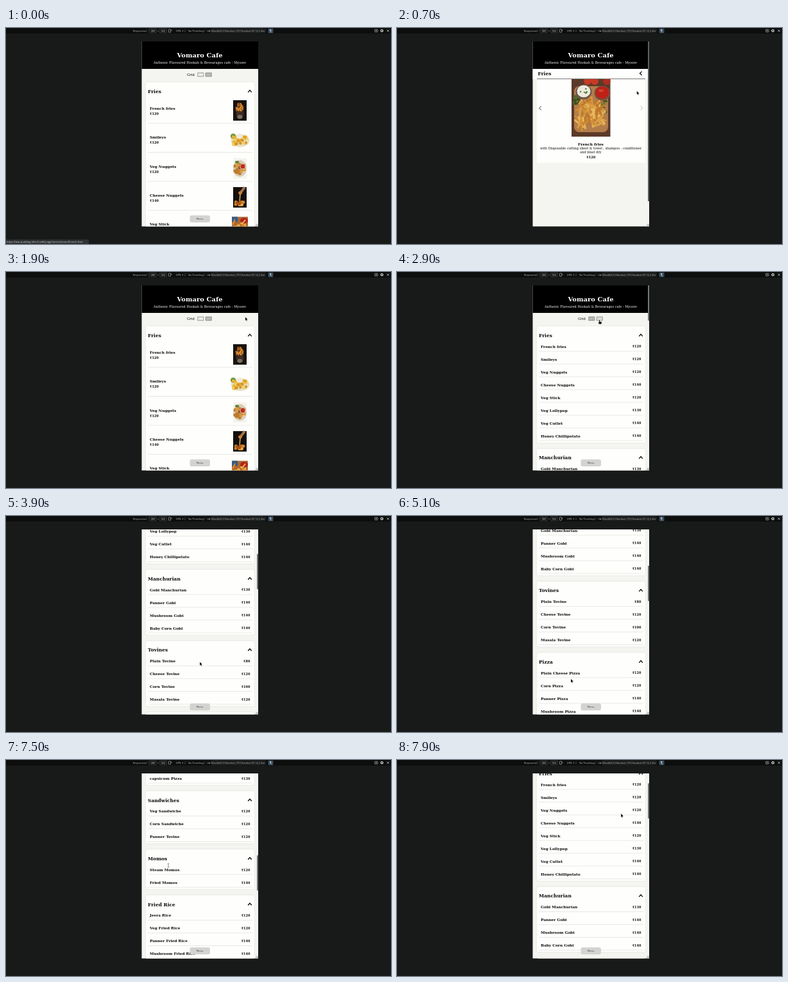
An HTML page with a canvas that plays this animation: 600x338 px, repeating every 8 s.

```html
<!DOCTYPE html>
<html lang="en">
<head>
<meta charset="utf-8">
<title>Cafe menu</title>
<style>
html, body { margin: 0; width: 100%; height: 100%; overflow: hidden; background: #171a19; }
canvas { display: block; width: 600px; height: 338px; }
</style>
</head>
<body>
<canvas id="stage" width="600" height="338"></canvas>
<script>
const c = document.getElementById('stage').getContext('2d');
const LOOP = 8000, STEP = 100;
const SERIF = '"DejaVu Serif", serif', SANS = '"Noto Sans", sans-serif';

const menu = [
  ['Fries', 'French fries 120,Smileys 120,Veg Nuggets 120,Cheese Nuggets 140,Veg Stick 120,Veg Lollypop 130,Veg Cutlet 140,Honey Chillipotato 140'],
  ['Manchurian', 'Gobi Manchurian 130,Panner Gobi 140,Mushroom Gobi 140,Baby Corn Gobi 140'],
  ['Tovines', 'Plain Tovine 80,Cheese Tovine 120,Corn Tovine 100,Masala Tovine 120'],
  ['Pizza', 'Plain Cheese Pizza 120,Corn Pizza 120,Panner Pizza 140,Mushroom Pizza 140,Onion Pizza 130,Tomato Pizza 130,Baby Corn Pizza 140,capsicum Pizza 130'],
  ['Sandwiches', 'Veg Sandwiche 120,Corn Sandwiche 120,Panner Tovine 120'],
  ['Momos', 'Steam Momos 120,Fried Momos 140'],
  ['Fried Rice', 'Jeera Rice 120,Veg Fried Rice 120,Panner Fried Rice 140,Mushroom Fried Rice 140,Corn Fried Rice 140'],
  ['Soft Drinks', 'Blim 50,Glinta 50,Orchard Fog 50,Tanbrok - can 150,Grumbox - Can 150,Vultarix 80,Zolva 50,lime Soda 60,lime Mint Soda 60'],
  ['Milkshakes', 'Dobi Milkshake 130,Chocolate Milkshake 130,Black Current Milkshake 130,Vanilla Milkshake 130']
].map(([title, items]) => [title, items.split(',').map(s => s.match(/(.*) (\d+)/).slice(1))]);

// Drawing helpers
function rect(x, y, w, h, fill, r = 0, stroke) {
  c.beginPath();
  c.roundRect(x, y, w, h, r);
  if (fill) { c.fillStyle = fill; c.fill(); }
  if (stroke) { c.strokeStyle = stroke; c.lineWidth = .6; c.stroke(); }
}
function disc(x, y, rx, ry, fill) {
  c.beginPath();
  c.ellipse(x, y, rx, ry, 0, 0, 7);
  c.fillStyle = fill;
  c.fill();
}
function line(color, width, ...p) {
  c.beginPath();
  for (let i = 0; i < p.length; i += 2) c.lineTo(p[i], p[i + 1]);
  c.strokeStyle = color;
  c.lineWidth = width;
  c.stroke();
}
// Laid out ten times larger so that small glyph widths are not rounded
function text(s, x, y, size, { color = '#0b0b0b', bold = false, font = SERIF, align = 'left' } = {}) {
  c.save();
  c.translate(x, y + size * .36);
  c.scale(.1, .1);
  c.font = `${bold ? 'bold ' : ''}${size * 10}px ${font}`;
  c.textAlign = align;
  c.fillStyle = color;
  c.fillText(s, 0, 0);
  c.restore();
}
const bold = (s, x, y, size, align) => text(s, x, y, size, { bold: true, align });
function clipped(x, y, w, h, draw) {
  c.save();
  c.beginPath();
  c.rect(x, y, w, h);
  c.clip();
  draw();
  c.restore();
}
function seeded(seed) {
  return () => (seed = seed * 16807 % 2147483647) / 2147483647;
}
function sticks(n, x, y, w, h, len, width, colors, seed) {
  const rnd = seeded(seed);
  for (let i = 0; i < n; i++) {
    const a = rnd() * 2.4 + .4, px = x + rnd() * w, py = y + rnd() * h;
    const dx = Math.cos(a) * len / 2, dy = Math.sin(a) * len / 2;
    line(colors[i % colors.length], width, px - dx, py - dy, px + dx, py + dy);
  }
}
function balls(n, x, y, w, h, r, colors, seed) {
  const rnd = seeded(seed);
  for (let i = 0; i < n; i++) disc(x + rnd() * w, y + rnd() * h, r, r, colors[i % colors.length]);
}

// Timing helpers
const clamp = p => Math.min(1, Math.max(0, p));
function track(keys, t) {
  const i = keys.findIndex(k => k[0] > t);
  if (i < 0) return keys[keys.length - 1].slice(1);
  if (!i) return keys[0].slice(1);
  const a = keys[i - 1], b = keys[i], p = (t - a[0]) / (b[0] - a[0]);
  return a.slice(1).map((v, j) => v + (b[j + 1] - v) * p);
}
function scrollAt(t) {
  const start = 260.7, drinks = 978.5, fries = 78;
  if (t < 5000) return track([[2900, 0], [3600, 150], [3650, 150], [4300, start]], t)[0];
  if (t < 7400) return start + (drinks - start) * (1 - Math.cos(Math.PI * clamp((t - 5000) / 840))) / 2;
  return fries + (drinks - fries) * (1 - clamp((t - 7400) / 480)) ** 2;
}
const pointer = [
  [200, 365, 128], [1000, 379, 81], [1300, 380, 70], [1800, 380, 70], [2700, 316, 75], [2900, 315, 75],
  [3600, 303, 180], [4300, 301, 293], [4400, 301, 293], [4800, 271, 255], [5100, 271, 255], [5800, 296, 281],
  [5900, 300, 291], [6200, 300, 291], [7100, 249, 167], [7200, 248, 165.5], [7400, 248, 165.5], [7500, 253, 165], [7900, 349, 84]
];

const photos = [
  y => {
    rect(354, y - 16, 21, 32, '#17120e');
    disc(364.5, y + 5, 6, 9, '#3d2d23');
    disc(364.5, y + 10, 4, 3, '#786e63');
    sticks(22, 360, y - 9, 9, 9, 7, 1.2, ['#d48424', '#b65d18', '#e8a444'], 17);
  },
  y => {
    rect(350, y - 15, 30, 30, '#fefefc');
    disc(365, y + 2, 14.5, 10, '#e9dfc2');
    disc(354, y - 5, 4, 4, '#6d9438');
    balls(32, 354, y - 5, 22, 14, 2.3, ['#e8b336', '#f2cd60', '#d59625'], 31);
    disc(364, y - 5, 4.5, 4, '#eeeae0');
  },
  y => {
    rect(354, y - 16, 21, 32, '#f6f3ed');
    disc(364.5, y, 10.5, 13, '#d9cdb8');
    balls(20, 357, y - 7, 15, 17, 2.6, ['#bd7a2b', '#d99b42', '#94561f'], 43);
    disc(369, y - 3, 4.6, 4.6, '#e7dcc9');
    disc(369, y - 3, 3.6, 3.6, '#bd2d1b');
    disc(360, y - 10, 3, 2, '#5e8137');
  },
  y => {
    rect(354, y - 16, 21, 32, '#130f0c');
    line('#a3704d', 4, 372, y - 16, 366, y - 8);
    disc(365, y - 7, 3, 2.5, '#c77b2f');
    line('#e0b05d', 1.5, 365, y - 6, 364, y + 8);
    balls(14, 358, y + 7, 13, 5, 2.4, ['#d8872a', '#a65418', '#e9a940'], 59);
  },
  y => {
    rect(352, y - 15, 25, 30, '#a96a35');
    rect(352, y - 15, 9, 8, '#365b86');
    disc(371, y - 9, 6, 4.5, '#b42319');
    sticks(26, 354, y - 8, 20, 18, 9, 2, ['#d6902f', '#e8b451', '#b9642a'], 71);
  }
];

function chevron(x, y, dx, dy, color, width) {
  const px = dy ? 2.8 : 1.6, py = dy ? 1.6 : 3;
  if (dy) line(color, width, x - px, y + py, x, y - py, x + px, y + py);
  else line(color, width, x - dx * px, y - py, x + dx * px, y, x - dx * px, y + py);
}

function header(scroll) {
  rect(211, 21 - scroll, 183, 43, '#000');
  text('Vomaro Cafe', 302, 42.3 - scroll, 10, { color: '#fff', bold: true, align: 'center' });
  text('Authenic Flavoured Hookah & Bevearages cafe - Mysore', 302, 54.5 - scroll, 5, { color: '#f4f4f4', align: 'center' });
}

function viewSwitch(y, grid) {
  text('Grid', 282, y, 5.3);
  rect(298.8, y - 2.8, 9, 5.6, grid ? '#f4f4f0' : '#c2c2c0', 0, '#555');
  for (const x of [301.8, 304.8]) line(grid ? '#b5b5b5' : '#777', .4, x, y - 2.8, x, y + 2.8);
  rect(311.2, y - 2.8, 9, 5.6, grid ? '#bdbdbb' : '#e6e6e4', 0, '#555');
  line('#999', .4, 311.2, y, 320.2, y);
}

function listing(scroll, grid) {
  header(scroll);
  viewSwitch(73 - scroll, grid);
  const pitch = grid ? 45.4 : 20;
  let y = 99 - scroll;
  for (const [title, items] of menu) {
    const h = 42 + pitch * (items.length - 1) + (grid ? 25 : 0);
    if (y < 340 && y + h > 0) {
      c.save();
      c.shadowColor = 'rgba(0,0,0,.13)';
      c.shadowBlur = 2;
      rect(218, y - 14, 169, h, '#fefefc', 3);
      c.restore();
      bold(title, 221, y + .2, 7.45);
      chevron(380, y, 0, -1, '#0b0b0b', 1.4);
      items.forEach(([name, price], i) => {
        const iy = y + (grid ? 26.6 : 17.7) + i * pitch;
        const rule = iy + (grid ? 23.5 : 7.3);
        bold(name, 224, iy, 5.85);
        if (grid) bold('₹' + price, 224, iy + 8.5, 5);
        else bold('₹' + price, 380.3, iy, 4.9, 'right');
        line('#dededb', .7, 221, rule, 384, rule);
        if (grid && photos[i]) photos[i](iy + 3.3);
      });
    }
    y += h + 9.5;
  }
  rect(286.5, 293.2, 31.5, 11, '#d3d3d1', 3);
  text('Menu', 302.2, 298.7, 3.9, { color: '#444', font: '"DejaVu Sans", sans-serif', align: 'center' });
}

function dish() {
  header(0);
  rect(211, 64, 183, 16, '#fefefc');
  bold('Fries', 219.5, 71.5, 7.45);
  chevron(380, 71, -1, 0, '#0b0b0b', 1.2);
  rect(218, 80, 169, 131, '#fefefc');
  line('#555', .8, 218, 79.6, 387, 79.6);
  clipped(272, 80, 60.5, 90, () => {
    rect(272, 80, 61, 90, '#5b3a29');
    rect(276, 91, 53, 72, '#b27c4b', 8);
    for (const x of [297, 308, 327]) disc(x, 83, 6, 6, x > 310 ? '#ad2d20' : '#c63a25');
    balls(10, 276, 106, 8, 18, 2.5, ['#53672c', '#3c5120'], 5);
    balls(7, 318, 112, 10, 20, 2, ['#62752f', '#415722'], 9);
    sticks(65, 283, 116, 37, 36, 19, 2.8, ['#dba044', '#e8b85e', '#bd762b', '#cf8c35'], 83);
    disc(291, 100, 12.5, 11.5, '#705747');
    disc(291, 99, 10.5, 9.5, '#ece9df');
    balls(6, 286, 94, 10, 8, 1.2, ['#567b35'], 13);
    disc(320, 102, 12.5, 11.5, '#77503e');
    disc(320, 101, 10.5, 9.5, '#bd2118');
    disc(318, 98, 4, 2, '#d5442d');
  });
  chevron(223.2, 125.5, -1, 0, '#222', .9);
  chevron(381.3, 125.5, 1, 0, '#b0b0b0', .9);
  bold('French fries', 302, 181.5, 5.85, 'center');
  text('with Disposable cutting sheet & towel , shampoo , conditioner', 302, 188, 5, { align: 'center' });
  text('and blast dry', 302, 194.2, 5, { align: 'center' });
  bold('₹120', 302.3, 201.8, 5, 'center');
}

function popup() {
  rect(228, 161, 148, 129, '#fefefc', 3, '#cfcfcc');
  menu.forEach(([title], i) => bold(title, 236, 169 + i * 12.4, 5.2));
}

function toolbar() {
  rect(0, 0, 600, 8.6, '#0c0d0d');
  const label = (s, x) => text(s, x, 4.4, 3.75, { color: '#b4b7b7', font: SANS });
  const spinner = x => {
    line('#999', .5, x - 1, 3.7, x, 2.7, x + 1, 3.7);
    line('#999', .5, x - 1, 5.1, x, 6.1, x + 1, 5.1);
  };
  label('Responsive', 198);
  spinner(219);
  rect(222.5, 1.2, 12.5, 6.4, '#1b1d1d', 1, '#414545');
  label('380', 225.7);
  label('×', 236.1);
  rect(239, 1.2, 12, 6.4, '#1b1d1d', 1, '#414545');
  label('926', 241.7);
  rect(253.5, 2, 3, 4.8, null, .4, '#c4c7c7');
  line('#c4c7c7', .5, 257, 3, 258, 3, 258, 5);
  label('DPR: 3', 265);
  spinner(279);
  label('No Throttling', 284);
  spinner(309);
  label('UA:', 313);
  rect(319.5, 1.2, 85, 6.4, '#1b1d1d', 1, '#303333');
  clipped(320, 0, 84, 8, () => label('Mozilla/5.0 (Handset; CPU Handset OS 14_6 like Mac', 320.3));
  rect(408.5, .8, 8, 7.2, '#3c4b57', 1);
  disc(412.2, 3.2, 1.2, 1.2, '#a8c8df');
  line('#a8c8df', .8, 412.2, 3, 412.2, 6, 414, 6);
  rect(574.7, 2.4, 4.5, 3.8, null, .5, '#d0d2d2');
  disc(577, 4.3, .8, .8, '#d0d2d2');
  disc(585.8, 4.3, 2.3, 2.3, '#d0d2d2');
  disc(585.8, 4.3, 1, 1, '#0c0d0d');
  line('#d0d2d2', .8, 593.6, 2.6, 597, 6);
  line('#d0d2d2', .8, 597, 2.6, 593.6, 6);
}

function cursor(t) {
  const [x, y] = track(pointer, t);
  const within = (a, b) => t >= a && t < b;
  c.save();
  c.translate(x, y);
  if (within(7500, 7700)) {
    line('#444', .6, -1.2, -2.8, 1.2, -2.8);
    line('#444', .6, 0, -2.8, 0, 2.8);
    line('#444', .6, -1.2, 2.8, 1.2, 2.8);
  } else {
    const hand = within(1200, 1900) || within(2600, 3000) || within(4300, 5100) || within(6100, 7500);
    const shape = new Path2D(hand
      ? 'M0 0L1 0L1.2 2.4L4 3.2L3.8 5.2L3 6.5L.2 6.5L-1.6 4L-1 3.5L0 4Z'
      : 'M0 0L0 5.4L1.2 4.3L2 6.2L2.9 5.8L2.1 3.9L3.8 3.8Z');
    c.strokeStyle = '#fff';
    c.lineWidth = .9;
    c.stroke(shape);
    c.fillStyle = '#111';
    c.fill(shape);
  }
  c.restore();
}

function draw(t) {
  const inDish = t >= 200 && t < 1900, scroll = scrollAt(t);
  rect(0, 0, 600, 338, '#171a19');
  toolbar();
  clipped(211.5, 21, 181.5, 289.5, () => {
    rect(211, 21, 183, 290, '#f4f4f0');
    if (inDish) dish();
    else listing(scroll, t < 2800);
    if ((t >= 4500 && t < 5100) || (t >= 6300 && t < 7500)) popup();

    if (inDish) {
      const w = 2 - clamp((t - 1000) / 300) * .8;
      rect(393 - w, 21, w, 250, `rgba(95,95,95,${1 - clamp((t - 1400) / 300)})`);
    } else if (t >= 2800) {
      rect(391, 21 + scroll * .1996, 2, 55, '#777');
    }
    rect(389, 306.5, 4, 4, '#d2d4d2');
    line('#858a88', .5, 389.8, 310, 392.7, 307.1);
    line('#858a88', .5, 391.4, 310, 392.7, 308.7);
  });
  if (t < 200) {
    rect(0, 331, 129, 7, '#303333');
    text('https://tear-pudding-a9cc3.netlify.app/service/menu/French fries', 1, 334.6, 3.9, { color: '#d3d5d5', font: SANS });
  } else cursor(t);
}

function frame(now) {
  draw(Math.floor(now % LOOP / STEP) * STEP);
  requestAnimationFrame(frame);
}
requestAnimationFrame(frame);
</script>
</body>
</html>
```
